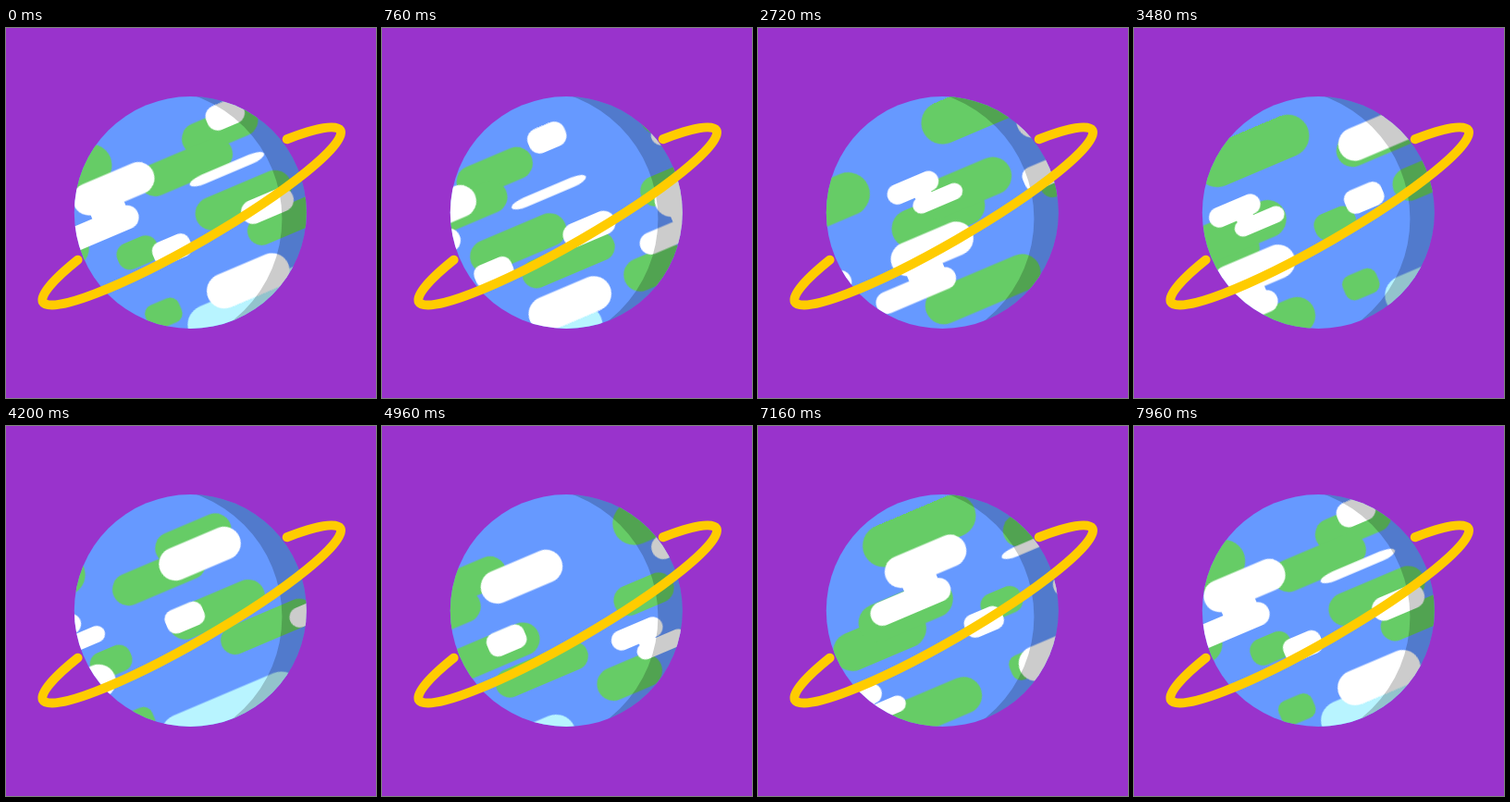
These frames come from a looping animation (400x400 px, 8 s). An HTML page:

```html
<!DOCTYPE html>
<html lang="en">
<head>
<meta charset="utf-8">
<title>Spinning planet</title>
<style>
  html, body { margin: 0; width: 100%; height: 100%; overflow: hidden; background: #9933cc; }
  svg { display: block; width: 100vw; height: 100vh; }
</style>
</head>
<body>
<svg viewBox="0 0 400 400">
  <defs>
    <clipPath id="disc"><circle cx="199.3" cy="199.5" r="125.5"/></clipPath>
  </defs>
  <g clip-path="url(#disc)">
    <rect width="400" height="400" fill="#6699ff"/>
    <g transform="translate(199 199.5) rotate(-23)">
      <g id="land"></g>
      <g id="clouds"></g>
    </g>
    <path fill="#000" fill-opacity=".2" fill-rule="evenodd"
      d="M0 0H400V400H0Z M17.2 206.2a140.6 140.6 0 1 0 281.2 0a140.6 140.6 0 1 0 -281.2 0Z"/>
  </g>
  <path transform="translate(200.5 203.5) rotate(-30)" fill="none" stroke="#ffcc00"
    stroke-width="10" stroke-linecap="round" d="M-130 -20.6A185.6 29 0 1 0 131 -20.5"/>
</svg>
<script>
const NS = 'http://www.w3.org/2000/svg';
const GREEN = '#66cc66', ICE = '#b8f4ff', WHITE = '#ffffff';

// Coordinates run along the planet's tilted equator, origin at its centre.
const box = (x0, x1, y0, y1, rx, ry = rx) => ({ x: x0, y: y0, width: x1 - x0, height: y1 - y0, rx, ry });
// A pill is given by the centres of its two round ends.
const pill = (x0, x1, y, r) => box(x0 - r, x1 + r, y - r, y + r, r);
const zigzag = (x, y) => [
  pill(x, x + 36.5, y, 11),
  pill(x + 19, x + 58, y + 21, 9),
  box(x + 16, x + 35, y + 6, y + 20, 0)
];

const continents = [
  pill(39, 90.5, -70, 17.5),
  pill(-21, 51, -47, 17.5),
  pill(21.3, 95.4, 10.3, 18),
  pill(63.6, 138.8, 48.5, 15.5),
  pill(166.5, 204, 93.3, 18),
  pill(217, 252, 16.5, 16.5),
  pill(255, 340, -58, 23.5),
  pill(388, 452, 3, 21),
  pill(425, 491.5, -15, 20.5),
  pill(388, 480, 93.5, 20),
  pill(464, 547, -89, 23),
  box(534, 580, 3, 32.5, 13),
  box(537.5, 576.5, 75.5, 103.5, 10)
];
const ice = [pill(-30, 88, 119, 21.5)];
const clouds = [
  box(55, 97.5, -96.5, -69, 12),
  box(11.5, 98.5, -32.7, -22.3, 16, 5.2),
  pill(63, 96.5, 26, 13),
  pill(1, 57, 92.5, 19),
  ...zigzag(191, -37),
  pill(174, 231, 32, 18.5),
  pill(135, 203, 66.5, 12),
  box(166, 207, 40, 60, 0),
  box(322, 365, -8.5, 18, 10),
  pill(357, 414, -52.5, 18),
  ...zigzag(458, 53),
  pill(575, 633, -56, 17.5),
  pill(539, 605, -22, 13),
  box(570, 609, -45, -28, 0),
  box(615, 658, 16, 42, 10)
];

function add(parent, name, attrs) {
  const el = document.createElementNS(NS, name);
  for (const key in attrs) el.setAttribute(key, attrs[key]);
  return parent.appendChild(el);
}

function scroll(id, period, duration, parts) {
  const layer = document.getElementById(id);
  for (const shift of [-period, 0, period]) {
    const copy = add(layer, 'g', { transform: `translate(${shift} 0)` });
    for (const [fill, shapes] of parts)
      for (const shape of shapes) add(copy, 'rect', { ...shape, fill });
  }
  const motion = layer.animate(
    [{ transform: 'translateX(0px)' }, { transform: `translateX(${-period}px)` }],
    { duration, iterations: Infinity, easing: `steps(${duration / 40})` }
  );
  motion.startTime = 0;
}

scroll('land', 626, 4000, [[GREEN, continents], [ICE, ice]]);
scroll('clouds', 670, 8000, [[WHITE, clouds]]);
</script>
</body>
</html>
```
